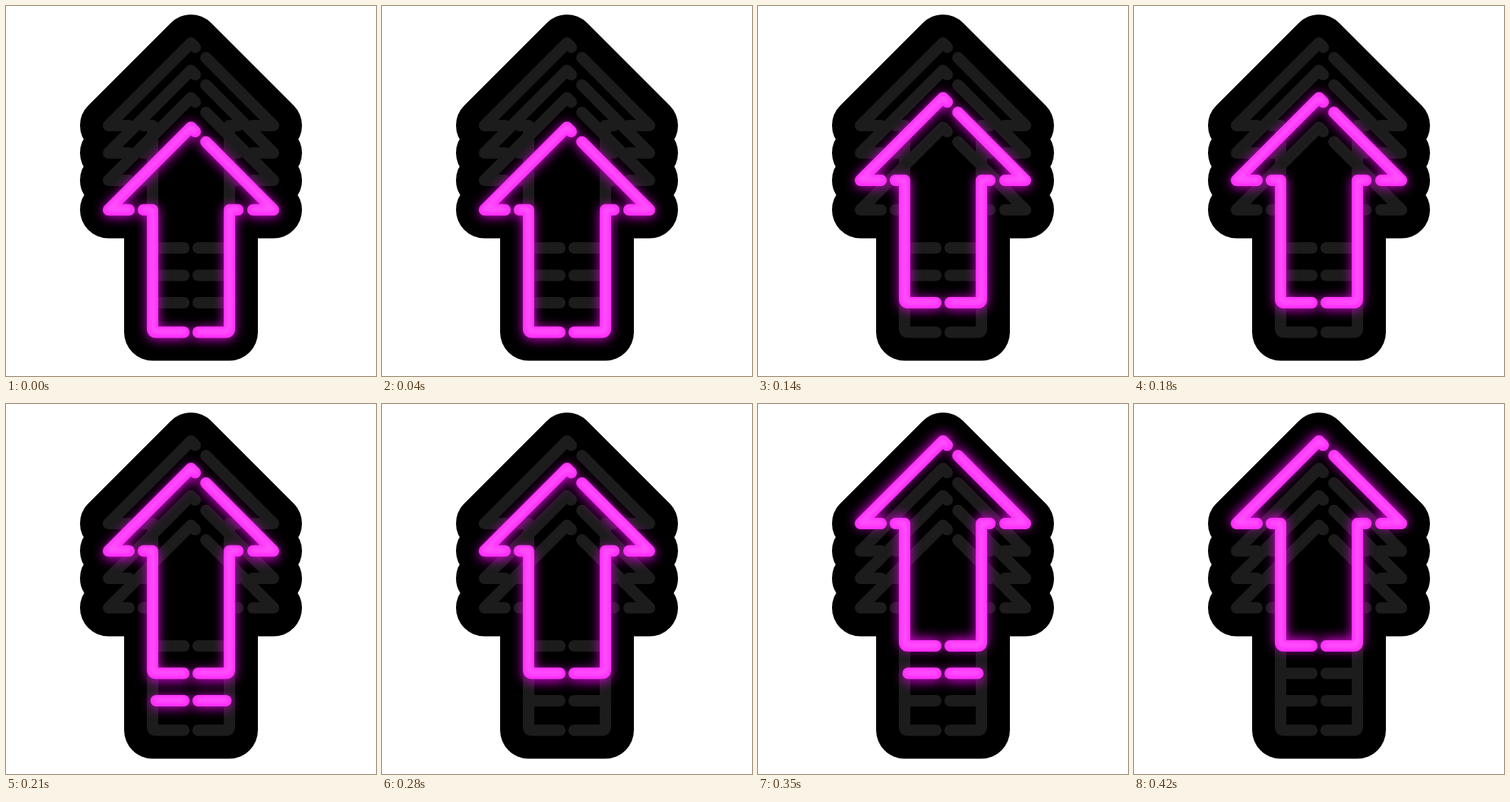
An HTML page that plays this animation: 520x520 px, repeating every 0.49 s.

```html
<!DOCTYPE html>
<html lang="en">
<head>
<meta charset="utf-8">
<title>Neon arrow</title>
<style>
  html, body { margin: 0; width: 100%; height: 100%; overflow: hidden; background: #fff; }
  svg { display: block; width: 100vw; height: 100vh; }
  .board { fill: #000; stroke: #000; stroke-width: 80; stroke-linejoin: round; }
  .tube { fill: none; stroke-width: 16; stroke-linecap: round; stroke-linejoin: round; }
  .off { stroke: #1c1c1c; }
  .glow { stroke: #f0f; opacity: .8; }
  .core { stroke: #ff2cfa; }
  .shine { stroke: #ff8cff; stroke-width: 8; opacity: .4; }
</style>
</head>
<body>
<svg id="stage" viewBox="0 0 520 520">
  <defs>
    <filter id="wide" filterUnits="userSpaceOnUse" x="60" y="0" width="400" height="520" color-interpolation-filters="sRGB">
      <feGaussianBlur stdDeviation="8"/>
    </filter>
    <filter id="soft" filterUnits="userSpaceOnUse" x="60" y="0" width="400" height="520" color-interpolation-filters="sRGB">
      <feGaussianBlur stdDeviation="3"/>
    </filter>
  </defs>
</svg>
<script>
const STEP_MS = 70;
const STEPS = 7;
const SHIFTS = [118.5, 77, 38.5, 0];       // lowest arrow first
const GLOW_SHIFTS = [2, 2, 4, -3];

const OUTLINE = 'M260 52L376 168H314V340H206V168H144Z';
const ARROW = [
  'M173 168H144L260 52L266 58',
  'M281 72.5L376 168H347',
  'M193 168H206V335Q206 340 211 340H250',
  'M326 168H314V335Q314 340 309 340H270'
].join('');
const BAR = 'M211 340H250M270 340H309';

const stage = document.getElementById('stage');

function add(parent, tag, attrs = {}) {
  const node = document.createElementNS('http://www.w3.org/2000/svg', tag);
  for (const [name, value] of Object.entries(attrs)) node.setAttribute(name, value);
  return parent.appendChild(node);
}

const shifted = y => `translate(0 ${y})`;

function addLit(d, index) {
  const group = add(stage, 'g');
  const y = SHIFTS[index];
  const glowY = y + GLOW_SHIFTS[index];
  const glow = add(group, 'g', { filter: 'url(#wide)' });
  add(glow, 'path', { d, class: 'tube glow', transform: shifted(glowY) });
  add(group, 'path', { d, class: 'tube core', transform: shifted(y) });
  const shine = add(group, 'g', { filter: 'url(#soft)' });
  add(shine, 'path', { d, class: 'tube shine', transform: shifted(y - 1) });
  return group;
}

for (const y of SHIFTS) add(stage, 'path', { d: OUTLINE, class: 'board', transform: shifted(y) });
for (const y of SHIFTS) add(stage, 'path', { d: ARROW, class: 'tube off', transform: shifted(y) });
const bars = SHIFTS.map((_, i) => addLit(BAR, i));
const arrows = SHIFTS.map((_, i) => addLit(ARROW, i));

function show(node, visible) {
  node.setAttribute('display', visible ? 'inline' : 'none');
}

// Each climb leaves the previous base bar lit for one step.
function render(time) {
  const step = Math.floor(time / STEP_MS) % STEPS;
  const current = Math.ceil(step / 2);
  const trailing = step % 2 ? current - 1 : -1;
  arrows.forEach((node, i) => show(node, i === current));
  bars.forEach((node, i) => show(node, i === trailing));
}

const start = performance.now();
function tick() {
  render(performance.now() - start);
  requestAnimationFrame(tick);
}
tick();
</script>
</body>
</html>
```
